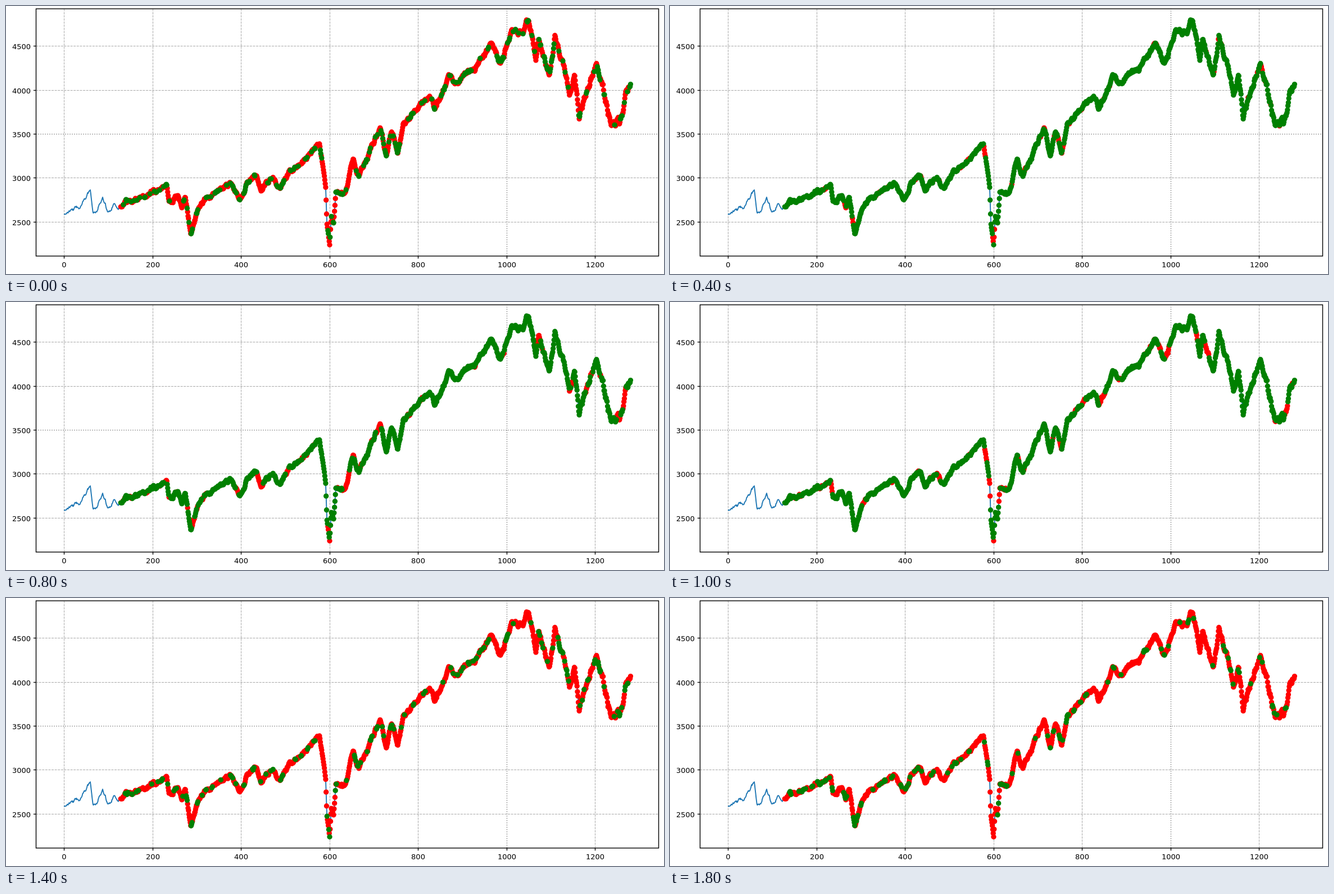
An HTML page with a canvas for the animation above (2000 ms loop, 1171 px wide and 478 px high).

```html
<!DOCTYPE html>
<html lang="en">
<head>
<meta charset="utf-8">
<title>Marked index chart</title>
<style>
  html, body { margin: 0; width: 100%; height: 100%; overflow: hidden; background: #fff; }
  canvas { display: block; }
</style>
</head>
<body>
<canvas id="stage" width="1171" height="478"></canvas>
<script>
const ctx = document.getElementById('stage').getContext('2d');
const RED = '#ff0000', GREEN = '#008000';
const FIRST = 128, LOW = 600, LAST = 1280;   // sample indices
const STEP = 200;                            // ms per state

const xOf = i => 103.5 + i * 0.7875;
const yOf = v => 385 - (v - 2500) * 0.15665;

// Main turning points of the curve; seeded noise fills in the rest
const turns = [
  [103, 373], [134, 356], [150, 328], [155, 370], [172, 341], [181, 368], [192, 352],
  [204, 358], [240, 340], [286, 318], [290, 348], [306, 338], [313, 360], [319, 340],
  [329, 408], [343, 360], [358, 341], [399, 315], [416, 346], [429, 314], [446, 303],
  [454, 330], [471, 308], [484, 323], [514, 287], [558, 246], [569, 324], [571, 387],
  [576, 426], [579, 375], [583, 388], [587, 332], [604, 333], [618, 272], [628, 304],
  [666, 217], [677, 268], [686, 224], [697, 264], [707, 209], [754, 161], [763, 185],
  [788, 122], [802, 137], [838, 106], [864, 66], [880, 102], [900, 42], [920, 50],
  [930, 25], [943, 97], [948, 58], [967, 124], [977, 51], [1003, 160], [1012, 122],
  [1020, 202], [1051, 102], [1077, 213], [1085, 214], [1098, 191], [1103, 152], [1112, 138]
];

// Each state: minority colour, its chance to start and to continue a run,
// and whether the lowest and the last sample carry it
const states = [
  { minor: GREEN, start: .15, stay: .3, last: true },
  { minor: GREEN, start: .008, stay: 0 },
  { minor: RED, start: .04, stay: .5 },
  { minor: GREEN, start: .12, stay: .3, low: true },
  { minor: RED, start: .06, stay: .75, low: true },
  { minor: RED, start: .05, stay: .75, low: true },
  { minor: RED, start: .05, stay: .75, low: true },
  { minor: GREEN, start: .11, stay: .3, low: true },
  { minor: GREEN, start: .11, stay: .3, last: true },
  { minor: GREEN, start: .09, stay: .45 }
];

function seeded(seed) {
  return () => {
    seed = (seed + 0x6D2B79F5) | 0;
    let t = Math.imul(seed ^ seed >>> 15, 1 | seed);
    t = t + Math.imul(t ^ t >>> 7, 61 | t) ^ t;
    return ((t ^ t >>> 14) >>> 0) / 4294967296;
  };
}

// Straight runs between turns plus mean-reverting noise that fades at each turn
function buildCurve() {
  const rand = seeded(7), points = [];
  let wave = 0;
  for (let i = 0, k = 0; i <= LAST; i++) {
    const x = xOf(i);
    while (turns[k + 1][0] < x) k++;
    const [x0, y0] = turns[k], [x1, y1] = turns[k + 1];
    const spread = 5 + 8 * (i / LAST) ** 6;
    wave = wave * .85 + (rand() - .5) * spread;
    const fade = Math.min(1, (x - x0) / 4, (x1 - x) / 4);
    points.push([x, y0 + (y1 - y0) * (x - x0) / (x1 - x0) + wave * fade]);
  }
  return points;
}

const curve = buildCurve();

// Split the marked samples of a state by colour
function colourise({ minor, start, stay, low = false, last = false }, n) {
  const rand = seeded(100 + n), marks = { [RED]: [], [GREEN]: [] };
  const major = minor === RED ? GREEN : RED;
  let run = false;
  for (let i = FIRST; i <= LAST; i++) {
    run = rand() < (run ? stay : start);
    const isMinor = i === LOW ? low : i === LAST ? last : run;
    marks[isMinor ? minor : major].push(curve[i]);
  }
  return marks;
}

const looks = states.map(colourise);

function line(x0, y0, x1, y1) {
  ctx.beginPath();
  ctx.moveTo(x0, y0);
  ctx.lineTo(x1, y1);
  ctx.stroke();
}

function gridLine(bold, ...ends) {
  ctx.strokeStyle = bold ? '#858585' : '#a8a8a8';
  ctx.setLineDash(bold ? [2, 2] : [4, 1.6]);
  line(...ends);
}

function axes(drawX, drawY) {
  for (let v = 0; v <= 1200; v += 200) drawX(v, Math.floor(xOf(v)) + .5);
  for (let v = 2500; v <= 4500; v += 500) drawY(v, Math.floor(yOf(v)) + .5);
}

function drawDots(points, colour) {
  ctx.fillStyle = colour;
  ctx.beginPath();
  for (const [x, y] of points) {
    ctx.moveTo(x + 4.7, y);
    ctx.arc(x, y, 4.7, 0, Math.PI * 2);
  }
  ctx.fill();
}

function draw(marks) {
  ctx.fillStyle = '#fff';
  ctx.fillRect(0, 0, 1171, 478);
  ctx.lineWidth = 1;
  axes((v, x) => gridLine(v === 1000, x, 446, x, 5),
       (v, y) => gridLine(v === 3500, 53, y, 1162, y));
  ctx.setLineDash([]);

  ctx.strokeStyle = '#1f77b4';
  ctx.lineWidth = 1.9;
  ctx.lineJoin = 'round';
  ctx.beginPath();
  curve.forEach(p => ctx.lineTo(...p));
  ctx.stroke();

  drawDots(marks[RED], RED);
  drawDots(marks[GREEN], GREEN);

  ctx.strokeStyle = ctx.fillStyle = '#000';
  ctx.lineWidth = 1.4;
  ctx.lineJoin = 'miter';
  ctx.strokeRect(53.5, 5, 1108, 441);
  ctx.font = '13px "DejaVu Sans", sans-serif';
  axes((v, x) => {
    line(x, 446, x, 450.5);
    ctx.textAlign = 'center';
    ctx.fillText(v, x, 466);
  }, (v, y) => {
    line(49, y, 53.5, y);
    ctx.textAlign = 'right';
    ctx.fillText(v, 44, y + 5);
  });
}

let shown = -1;
const begin = performance.now();
function tick() {
  const n = Math.floor((performance.now() - begin) / STEP) % states.length;
  if (n !== shown) draw(looks[shown = n]);
  requestAnimationFrame(tick);
}
tick();
</script>
</body>
</html>
```
